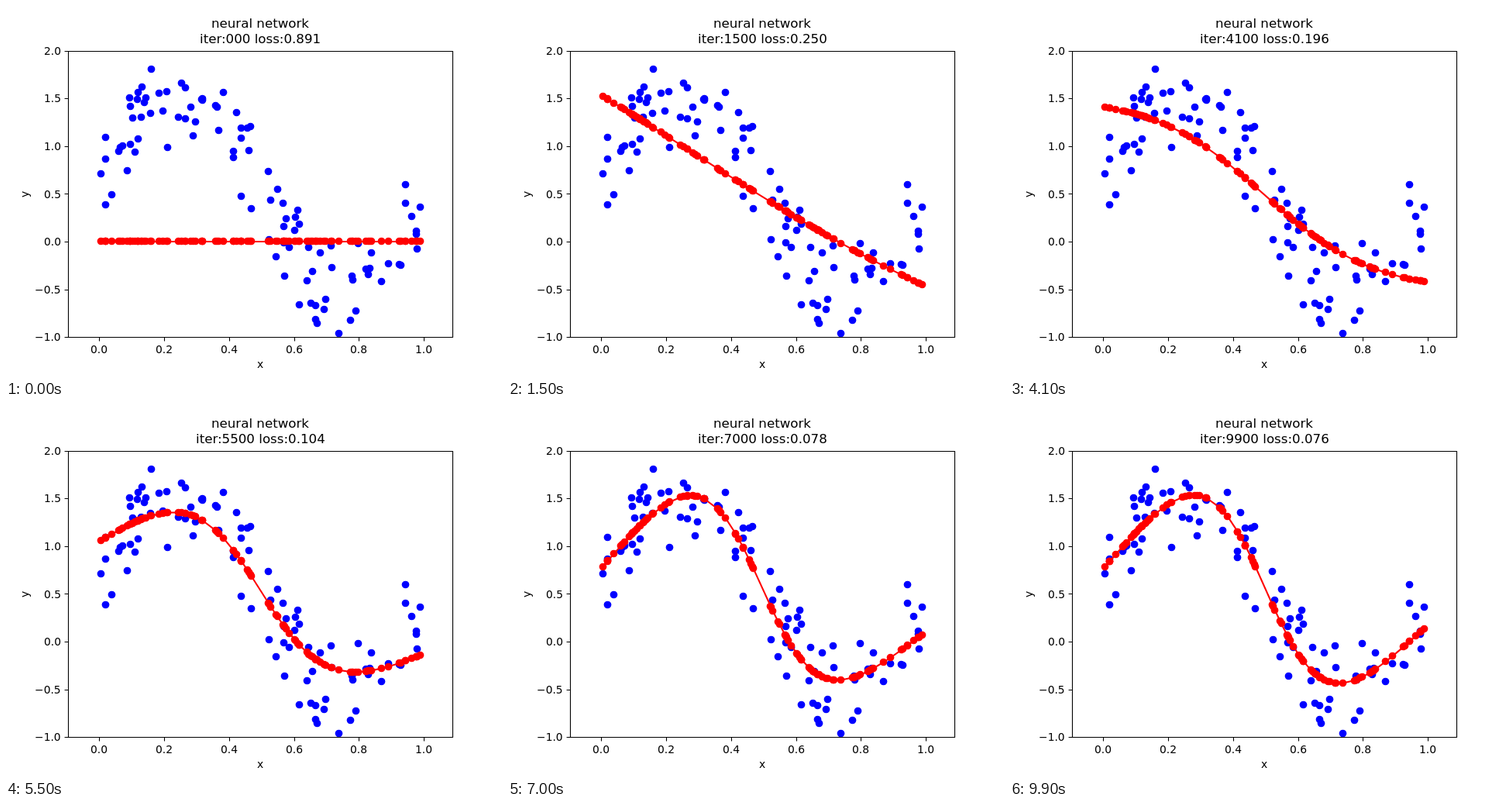
Recreate the animation shown at these times as an HTML page. Size 640x480 px, loop 10000 ms.

```html
<!DOCTYPE html>
<html lang="en">
<head>
<meta charset="utf-8">
<title>neural network</title>
<style>
html, body { margin: 0; width: 100%; height: 100%; overflow: hidden; background: #fff; }
svg { display: block; width: 640px; height: 480px; }
text { font: 13.89px "DejaVu Sans", sans-serif; }
.title { font-size: 16.67px; }
.axes { fill: none; stroke: #000; stroke-width: 1.1; }
</style>
</head>
<body>
<svg id="plot" viewBox="0 0 640 480">
  <defs><clipPath id="area"><rect x="80" y="57.6" width="496" height="369.6"/></clipPath></defs>
  <g clip-path="url(#area)">
    <g id="data" fill="#00f"></g>
    <path id="curve" fill="none" stroke="#f00" stroke-width="2.08" stroke-linejoin="round"/>
    <g id="fit" fill="#f00"></g>
  </g>
  <path id="axes" class="axes"/>
  <g id="labels">
    <text transform="translate(29 247) rotate(-90)">y</text>
  </g>
</svg>
<script>
const $ = id => document.getElementById(id);
const LOOP = 10000, STEP = 100, POINTS = 100, HIDDEN = 10, RATE = 0.2;

// Mersenne Twister, uniform doubles in [0, 1)
function twister(seed) {
  const N = 624, M = 397, s = new Uint32Array(N);
  s[0] = seed;
  for (let i = 1; i < N; i++)
    s[i] = Math.imul(1812433253, s[i - 1] ^ (s[i - 1] >>> 30)) + i;
  let pos = N;
  function next() {
    if (pos === N) {
      for (let i = 0; i < N; i++) {
        const y = (s[i] & 0x80000000) | (s[(i + 1) % N] & 0x7fffffff);
        s[i] = s[(i + M) % N] ^ (y >>> 1) ^ (y & 1 ? 0x9908b0df : 0);
      }
      pos = 0;
    }
    let y = s[pos++];
    y ^= y >>> 11;
    y ^= (y << 7) & 0x9d2c5680;
    y ^= (y << 15) & 0xefc60000;
    return (y ^ (y >>> 18)) >>> 0;
  }
  return () => {
    const high = next() >>> 5, low = next() >>> 6;
    return (high * 67108864 + low) / 9007199254740992;
  };
}

// Polar method, two normal values per round
function normal(rand) {
  let spare = null;
  return () => {
    if (spare !== null) {
      const v = spare;
      spare = null;
      return v;
    }
    let a, b, r;
    do {
      a = 2 * rand() - 1;
      b = 2 * rand() - 1;
      r = a * a + b * b;
    } while (r >= 1 || r === 0);
    const f = Math.sqrt(-2 * Math.log(r) / r);
    spare = f * a;
    return f * b;
  };
}

const fill = (n, f) => Float64Array.from({ length: n }, f);
const rand = twister(0), randn = normal(rand);
const xs = fill(POINTS, rand).sort();
const ys = xs.map(x => Math.sin(2 * Math.PI * x) + rand());

// One sigmoid hidden layer, full-batch gradient descent on the squared error
function train() {
  const w1 = fill(HIDDEN, () => 0.01 * randn()), b1 = new Float64Array(HIDDEN);
  const w2 = fill(HIDDEN, () => 0.01 * randn());
  const h = new Float64Array(HIDDEN);
  const g1 = new Float64Array(HIDDEN), gb = new Float64Array(HIDDEN), g2 = new Float64Array(HIDDEN);
  const history = [];
  let b2 = 0;
  for (let iter = 0; iter <= LOOP - STEP; iter++) {
    const fit = new Float64Array(POINTS);
    let loss = 0, gb2 = 0;
    g1.fill(0);
    gb.fill(0);
    g2.fill(0);
    for (let i = 0; i < POINTS; i++) {
      let out = b2;
      for (let j = 0; j < HIDDEN; j++) {
        h[j] = 1 / (1 + Math.exp(-(xs[i] * w1[j] + b1[j])));
        out += h[j] * w2[j];
      }
      fit[i] = out;
      const err = out - ys[i], g = 2 * err / POINTS;
      loss += err * err / POINTS;
      gb2 += g;
      for (let j = 0; j < HIDDEN; j++) {
        const back = g * w2[j] * h[j] * (1 - h[j]);
        g2[j] += g * h[j];
        g1[j] += back * xs[i];
        gb[j] += back;
      }
    }
    if (iter % STEP === 0) history.push({ iter, loss, fit });
    for (let j = 0; j < HIDDEN; j++) {
      w1[j] -= RATE * g1[j];
      b1[j] -= RATE * gb[j];
      w2[j] -= RATE * g2[j];
    }
    b2 -= RATE * gb2;
  }
  return history;
}

const px = x => 120.3 + 418.8 * x;
const py = y => 304 - 123.2 * y;
const snap = v => Math.floor(v) + 0.5;

function add(parent, tag, attrs) {
  const el = document.createElementNS("http://www.w3.org/2000/svg", tag);
  for (const k in attrs) el.setAttribute(k, attrs[k]);
  return parent.appendChild(el);
}

const dot = (parent, x, y) =>
  add(parent, "circle", { cx: snap(px(x)), cy: snap(py(y)), r: 4.86 });

// Text starts on a whole pixel; align is 0.5 for centred, 1 for right
function write(el, text, x, align) {
  el.textContent = text;
  el.setAttribute("x", Math.round(x - align * el.getComputedTextLength()));
}

function label(text, x, y, align = 0.5, cls = "") {
  const el = add($("labels"), "text", { y: Math.round(y), class: cls });
  write(el, text, x, align);
  return el;
}

function drawAxes() {
  let d = "M80.5 58.5H576.5V427.5H80.5Z";
  for (let v = 0; v <= 5; v++) {
    const x = px(v / 5);
    d += `M${snap(x + 0.5)} 427.5v4.9`;
    label((v / 5).toFixed(1), x, 448);
  }
  for (let v = -2; v <= 4; v++) {
    const y = py(v / 2);
    d += `M80.5 ${snap(y + 0.5)}h-4.9`;
    label((v / 2).toFixed(1).replace("-", "\u2212"), 71.1, y + 5.2, 1);
  }
  $("axes").setAttribute("d", d);
}

drawAxes();
label("x", 328, 467);
label("neural network", 328, 28, 0.5, "title");
const status = label("", 328, 48, 0.5, "title");
xs.forEach((x, i) => dot($("data"), x, ys[i]));
const fitDots = Array.from(xs, x => dot($("fit"), x, 0));
const history = train();

function render({ iter, loss, fit }) {
  fitDots.forEach((el, i) => el.setAttribute("cy", snap(py(fit[i]))));
  const path = Array.from(xs, (x, i) => `${px(x).toFixed(2)} ${py(fit[i]).toFixed(2)}`);
  $("curve").setAttribute("d", "M" + path.join("L"));
  write(status, `iter:${String(iter).padStart(3, "0")} loss:${loss.toFixed(3)}`, 328, 0.5);
}

let shown = 0;
const start = performance.now();
function tick() {
  const step = Math.floor((performance.now() - start) % LOOP / STEP);
  if (step !== shown) render(history[shown = step]);
  requestAnimationFrame(tick);
}
render(history[0]);
tick();
</script>
</body>
</html>
```
